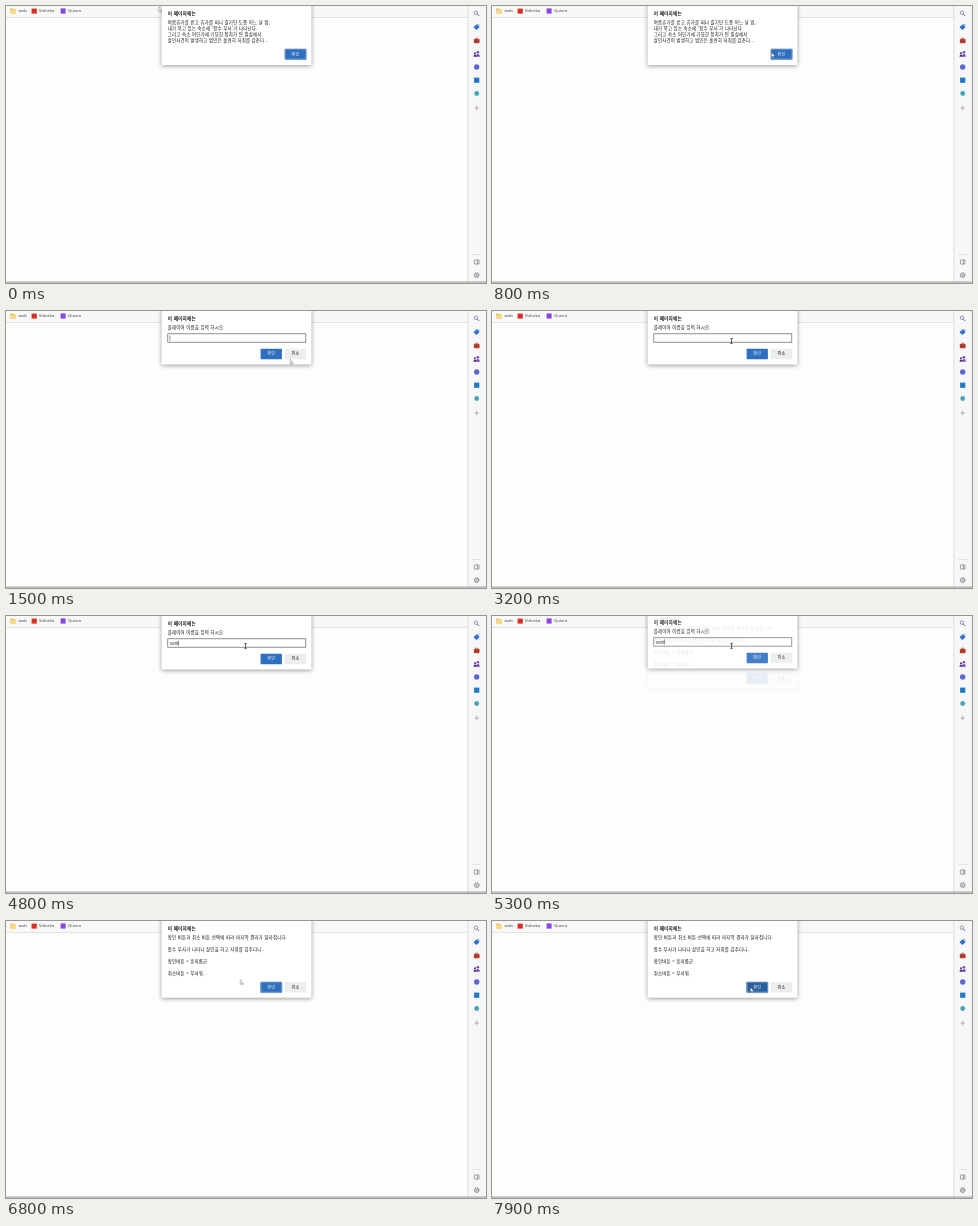
An HTML page that plays this animation: 480 by 277 pixels, repeating every 8000 ms.

```html
<!DOCTYPE html>
<html lang="ko">
<head>
<meta charset="utf-8">
<style>
html, body { margin: 0; height: 100%; overflow: hidden; background: #fdfdfc; }
svg { display: block; width: 100vw; height: 100vh; }
text { font: 4.4px "Noto Sans CJK KR", "Noto Sans CJK", "Noto Sans", sans-serif; letter-spacing: .22px; fill: #111; white-space: pre; }
.title { font-size: 4.6px; font-weight: bold; }
.mark { font: 4.2px "Noto Sans", sans-serif; letter-spacing: 0; fill: #444; }
.mid { text-anchor: middle; font-size: 4.1px; }
.panel { fill: #fff; filter: drop-shadow(0 1.5px 1.9px #0006); }
.ok { fill: #2f6fc0; }
.hover .ok { fill: #2a5f9f; }
.ring { fill: none; stroke: #7fa6d6; stroke-width: .4; }
.edge { fill: none; stroke: #5f82ae; stroke-width: .6; }
.line { fill: none; stroke: #5c6068; stroke-width: .6; }
</style>
</head>
<body>
<svg viewBox="0 0 480 277" preserveAspectRatio="none">
  <rect width="480" height="277" fill="#fdfdfc"/>
  <rect width="462" height="11" fill="#f8f8f8"/>
  <rect y="11" width="462" height=".8" fill="#dedede"/>
  <path d="M4.3 2.6h2.2l.8.8h2.7v4.2H4.3z" fill="#e8bf55"/>
  <path d="M4.3 4.2h5.7v3.4H4.3z" fill="#f8dc8c"/>
  <text class="mark" x="12.6" y="6.4">web</text>
  <rect x="25.6" y="2.6" width="5.2" height="5" fill="#dd2c22"/>
  <text class="mark" x="33" y="6.4">Vidorka</text>
  <rect x="54.6" y="2.4" width="5" height="5.2" fill="#8a45e8"/>
  <text class="mark" x="62" y="6.4">Quivro</text>

  <rect x="462" width="18" height="277" fill="#f7f7f7"/>
  <rect x="461.5" width=".8" height="277" fill="#d6d6d6"/>
  <g transform="translate(-.4 0)">
    <g class="line">
      <circle cx="470.3" cy="6.7" r="1.7" stroke="#4c5588"/>
      <path d="M471.7 8.1l1.9 1.9" stroke="#4c5588" stroke-width=".9"/>
      <path d="M468.8 102h4.6M471.1 99.7v4.6" stroke="#8a8a8a"/>
      <path d="M466.5 248.5h9" stroke="#d4d4d4"/>
      <rect x="468.8" y="253.9" width="4.6" height="4.2" rx=".7"/>
      <path d="M471.8 254v4"/>
      <circle cx="471.1" cy="269.2" r="2.1"/>
      <circle cx="471.1" cy="269.2" r=".6"/>
      <circle cx="471.1" cy="269.2" r="2.5" stroke-dasharray=".9 1.06"/>
    </g>
    <path d="M470.7 18.5h2.9v2.9l-2.8 2.7-2.9-2.9z" fill="#2f6fd0"/>
    <circle cx="472.6" cy="19.5" r=".5" fill="#fff"/>
    <path d="M469.9 33.3v-1.1h2.4v1.1" fill="none" stroke="#8d2420" stroke-width=".6"/>
    <rect x="468.3" y="33" width="5.6" height="4.2" rx=".6" fill="#c0402f"/>
    <path d="M468.3 35.1h5.6" stroke="#7c2a1d" stroke-width=".6"/>
    <g fill="#7446b8">
      <circle cx="472.3" cy="46.3" r="1.3"/>
      <path d="M470.4 50.8c0-3.8 3.8-3.8 3.8 0z"/>
      <circle cx="469.4" cy="47.3" r="1" fill="#403080"/>
      <path d="M468 50.8c0-3.2 2.8-3.2 2.8 0z" fill="#403080"/>
    </g>
    <circle cx="471.1" cy="61" r="2.7" fill="#5a67d2"/>
    <rect x="468.5" y="71.6" width="5.2" height="5.2" fill="#1d78c8"/>
    <circle cx="471.1" cy="87.5" r="2.4" fill="#4aa3b5"/>
  </g>
  <rect y="275.6" width="480" height=".9" fill="#8b8b8b"/>

  <g id="dialogs"></g>
  <path id="arrow" d="M0 0V4.7L1.1 3.7 1.9 5.3 2.6 5 1.9 3.5H3.3z" fill="#fff" stroke="#555" stroke-width=".38"/>
  <path id="beam" d="M-1.2-2.4H1.2M0-2.4V2.4M-1.2 2.4H1.2" fill="none" stroke="#222" stroke-width=".7"/>
</svg>
<script>
const LOOP = 8000, NAME = "soril";
const $ = id => document.getElementById(id);
const clamp = v => Math.max(0, Math.min(1, v));

const lines = (rows, step) => rows.map((s, i) =>
  `<text x="161.7" y="${17.9 + i * step}">${s}</text>`).join("");

const okButton = (x, y) => `<rect class="ok" x="${x}" y="${y}" width="21.3" height="10.6" rx=".5"/>
  <g class="focus"><rect class="edge" x="${x}" y="${y}" width="21.3" height="10.6" rx=".5"/>
  <rect class="ring" x="${x + .7}" y="${y + .7}" width="19.9" height="9.2"/></g>
  <text class="mid" x="${x + 10.7}" y="${y + 6.7}" style="fill:#fff">확인</text>`;

const cancelButton = y => `<rect x="278.9" y="${y}" width="21.3" height="10.6" rx=".5" fill="#ededed"/>
  <text class="mid" x="289.6" y="${y + 6.7}">취소</text>`;

const dialog = (id, height, body) => `<g id="${id}">
  <rect class="panel" x="155.6" y="-10" width="149.8" height="${height + 10}" rx="1"/>
  <text class="title" x="161.7" y="9">이 페이지에는</text>${body}</g>`;

$("dialogs").innerHTML =
  dialog("intro", 58.9, lines([
    "여름휴가를 받고 휴가를 떠나 즐기던 도중 어느 날 밤,",
    "내가 묵고 있는 숙소에 '함수 무사'가 나타난다.",
    "그리고 숙소 어딘가에 기묘한 장치가 된 밀실에서",
    "살인사건이 발생하고 범인은 홀연히 자취를 감춘다..."], 6.1) + okButton(278.9, 43)) +
  dialog("ask", 53.6, lines(["플레이어 이름을 입력 하시오."], 0) +
    `<rect x="161.8" y="22.8" width="138" height="8.4" fill="#fff" stroke="#555" stroke-width=".65"/>
     <text id="typed" x="163.9" y="28.6" style="font-size:4.3px;letter-spacing:0"></text>
     <rect id="caret" y="24.5" width=".5" height="5.2" fill="#222"/>` +
    okButton(254.6, 37.7) + cancelButton(37.7)) +
  dialog("choice", 76.8, lines([
    "확인 버튼과 취소 버튼 선택에 따라 마지막 결과가 달라집니다.",
    "함수 무사가 나타나 살인을 하고 자취를 감추다니..",
    "확인버튼 = 흥미롭군",
    "취소버튼 = 무서워.."], 12.1) + okButton(254.6, 61) + cancelButton(61));

document.querySelector("#ask .focus").remove();
const introFocus = document.querySelector("#intro .focus");

// time, x, y of the pointer
const path = [[0, 152.8, 1], [900, 284, 48.2], [1850, 284, 48.2], [2400, 239.5, 30],
  [5550, 239.5, 30], [6100, 227, 43], [6400, 225.8, 56], [6500, 225.8, 56],
  [7400, 258.3, 66.2], [LOOP, 258.5, 66.4]];

function pointer(t) {
  const i = path.findIndex(p => p[0] > t);
  const [a, x, y] = path[i - 1], [b, u, v] = path[i];
  const k = (t - a) / (b - a), e = k * k * (3 - 2 * k);
  return [x + (u - x) * e, y + (v - y) * e];
}

// The leaving dialog stays solid until the next one is half in.
function place(id, enter, leave) {
  const g = $(id);
  g.setAttribute("transform", `translate(0 ${-4.5 * (1 - enter) - 10 * leave})`);
  g.setAttribute("opacity", enter * clamp(2 - 2 * leave));
}

function draw(t) {
  const first = clamp((t - 1280) / 200), second = clamp((t - 5280) / 200);
  place("intro", 1, first);
  place("ask", first, second);
  place("choice", second, 0);
  introFocus.setAttribute("opacity", t < 1100 ? 1 : 0);

  const count = t < 3700 ? 0 : t < 4500 ? 1 : t < 4800 ? 2 : NAME.length;
  $("typed").textContent = NAME.slice(0, count);
  const width = count ? $("typed").getComputedTextLength() : 0;
  $("caret").setAttribute("x", 163.7 + width);
  const off = (t >= 1900 && t < 2400) || (t >= 2900 && t < 3400) || (t >= 4200 && t < 4500);
  $("caret").setAttribute("opacity", off ? 0 : 1);

  const [x, y] = pointer(t), typing = t >= 2300 && t < 5400;
  for (const [id, on] of [["arrow", !typing], ["beam", typing]]) {
    $(id).setAttribute("transform", `translate(${x} ${y})`);
    $(id).setAttribute("opacity", on ? 1 : 0);
  }
  $("choice").setAttribute("class", x > 254.6 && y > 61 ? "hover" : "");
}

function tick(now) {
  draw(now % LOOP);
  requestAnimationFrame(tick);
}
draw(0);
requestAnimationFrame(tick);
</script>
</body>
</html>
```
